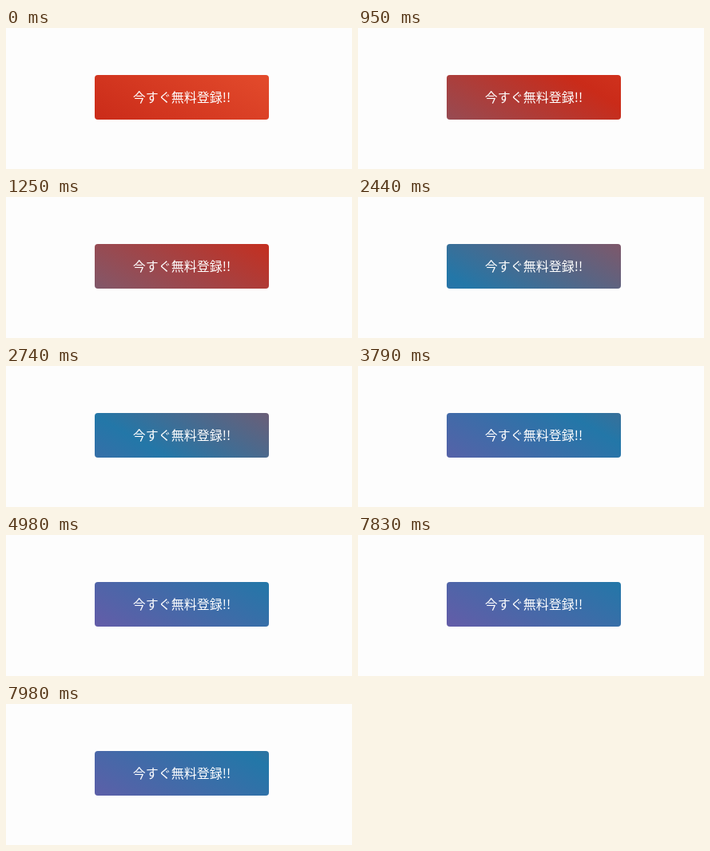
Write an HTML page that moves like this. It is 433 px wide and 177 px high and loops after 8 s.

```html
<!DOCTYPE html>
<html lang="ja">
<head>
<meta charset="utf-8">
<title>Gradient button</title>
<style>
  html, body {
    margin: 0;
    width: 100%;
    height: 100%;
    overflow: hidden;
    background: #fdfdfd;
  }
  .button {
    position: absolute;
    left: 111px;
    top: 59px;
    width: 218px;
    height: 56px;
    border-radius: 4px;
    color: #fff;
    font: 500 16px/54px "Noto Sans CJK JP", "Noto Sans CJK", sans-serif;
    text-align: center;
    white-space: nowrap;
    background: linear-gradient(30deg, #645ca8, #2377a8, #885463, #ca2b19, #e34b2c) 100% 0 / 400% 400%;
  }
</style>
</head>
<body>
<div class="button">今すぐ無料登録!!</div>
<script>
  const LOOP = 8000;
  const MOVE = 4800;
  const OUT = 270;   // sweep towards blue begins
  const BACK = 7880; // sweep back begins
  const END = BACK + MOVE;
  const STEP = 149.5; // the picture refreshes at this pace
  const PHASE = 46;

  const warm = '100% 0%';
  const cool = '0% 100%';
  const easeOutQuad = 'cubic-bezier(.333, .667, .667, 1)';
  const key = (time, backgroundPosition, easing = 'linear') =>
    ({ offset: time / END, backgroundPosition, easing });

  const sweep = document.querySelector('.button').animate([
    key(0, warm),
    key(OUT, warm, easeOutQuad),
    key(OUT + MOVE, cool),
    key(BACK, cool, easeOutQuad),
    key(END, warm)
  ], { duration: END, fill: 'both' });
  sweep.pause();

  const start = performance.now();

  function draw() {
    const t = (performance.now() - start) % LOOP;
    const tick = Math.floor((t - PHASE) / STEP) * STEP + PHASE;
    sweep.currentTime = Math.max(0, tick);
    requestAnimationFrame(draw);
  }
  draw();
</script>
</body>
</html>
```
